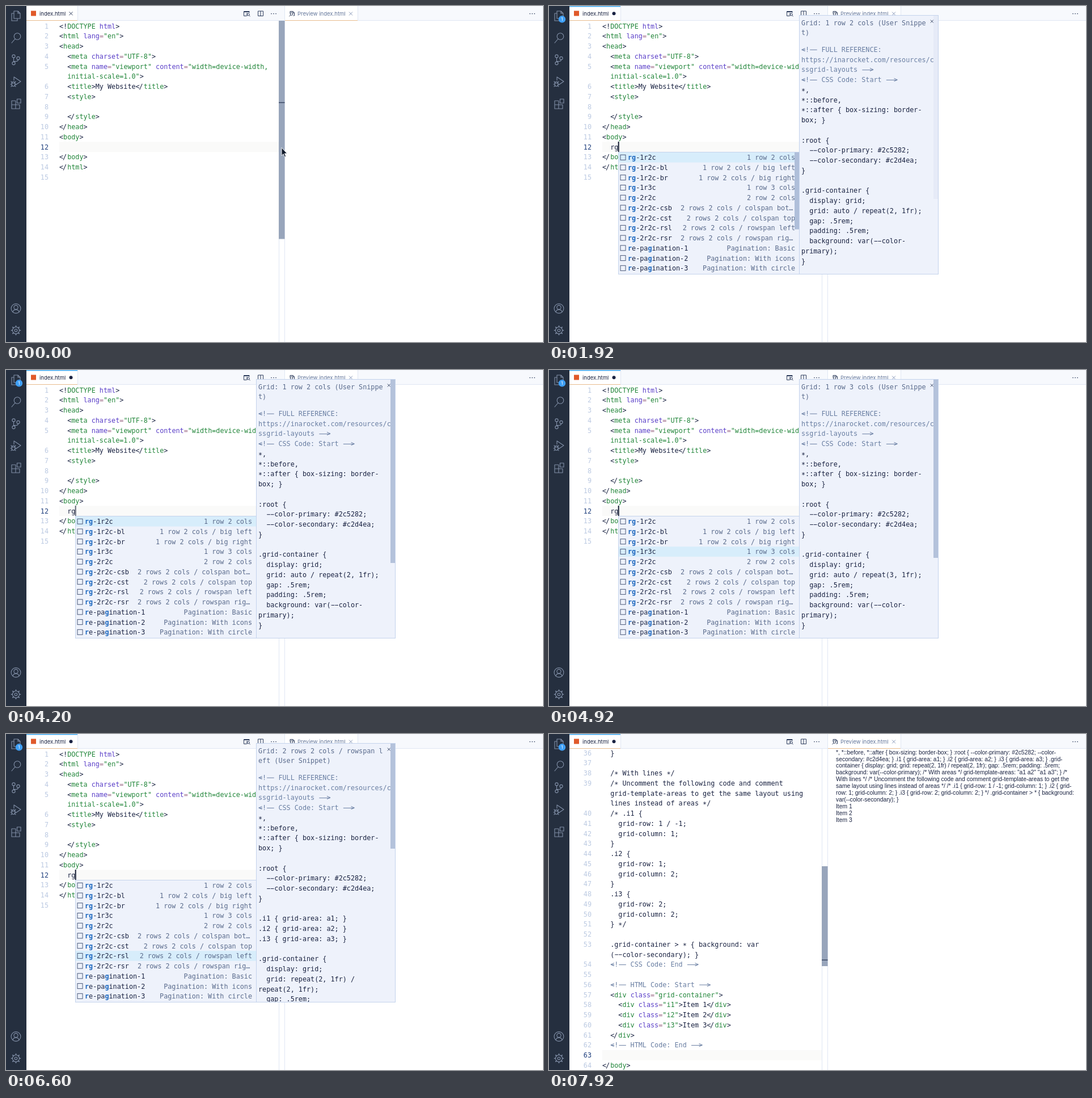
An HTML page that plays this animation: 947x592 px, repeating every 8000 ms.

```html
<!DOCTYPE html>
<html lang="en">
<head>
<meta charset="utf-8">
<title>Snippet completion</title>
<style>
html, body { margin: 0; width: 100%; height: 100%; overflow: hidden; background: #fff; }
svg { display: block; width: 100%; height: 100%; }
.code { font: 11.78px "DejaVu Sans Mono", monospace; }
.ui { font: 9.5px Inter, sans-serif; }
.page { font: 10.3px "Liberation Sans", Arial, sans-serif; }
.icon { fill: none; stroke: #8290a8; stroke-width: 1.1; stroke-linejoin: round; stroke-linecap: round; }
.tool { fill: none; stroke: #2b3a5a; stroke-width: 1; }
</style>
</head>
<body>
<svg id="stage" viewBox="0 0 947 592" preserveAspectRatio="none"></svg>
<script>
const LOOP = 8000, CW = 7.09, ROW = 17.75;
const INK = '#1a2342', GREEN = '#22863a', PURPLE = '#5a3fc8', NOTE = '#6a7fa3', MUTED = '#5a6b8c';
const T = { type: 1440, second: 1560, list: 1740, details: 1860, accept: 7200, preview: 7440 };
const MOVES = [4560, 4740, 4920, 5160, 5460, 5880, 6300];

const esc = s => s.replace(/&/g, '&amp;').replace(/</g, '&lt;').replace(/>/g, '&gt;').replace(/ /g, '\u00a0');
const rect = (x, y, w, h, fill, extra = '') =>
  `<rect x="${x}" y="${y}" width="${w}" height="${h}" fill="${fill}" ${extra}/>`;
const label = (x, y, s, fill, extra = '') => `<text x="${x}" y="${y}" fill="${fill}" ${extra}>${esc(s)}</text>`;
const path = (d, extra = '') => `<path d="${d}" ${extra}/>`;
const ramp = (t, a, b) => Math.max(0, Math.min(1, (t - a) / (b - a)));

// Moves one glyph without moving the text after it
const nudge = (ch, dx, dy) =>
  `<tspan dx="${dx}" dy="${dy}">${ch}</tspan><tspan dx="${-dx}" dy="${-dy}">\u200b</tspan>`;

// Syntax colours, in order of the capture groups below
const TOKEN = /(<!--.*)|("[^"]*"?|^\s*initial[^>]*)|((?<=<[\/!]?)[a-zA-Z]+)|([a-z]+(?==")|(?<=DOCTYPE )html)|(=(?="))/g;
const TINTS = [NOTE, GREEN, GREEN, PURPLE, '#a0708c'];

// Dash strokes, relative to the start of each ligature
const DASHES = { '<!--': [[1.5, 5.5], [15.2, 12.5]], '-->': [[1, 19]], '--': [[1, 5.7], [7.6, 5.7]] };

// One line of code centred on y
function code(x, y, s, fill = INK) {
  const base = y + 4.2;
  let lines = '', out = '', last = 0;
  for (const m of s.matchAll(/<!--|-->|--/g))
    for (const [dx, w] of DASHES[m[0]]) lines += `M${x + m.index * CW + dx} ${base - 3.7}h${w}`;
  const part = (str, tint) => {
    const body = esc(str.replace(/--/g, '  '))
      .replace(/&lt;\//g, '&lt;' + nudge('/', -1.2, 0))
      .replace(/\*/g, nudge('*', 0, 1.8));
    out += `<tspan fill="${tint}">${body}</tspan>`;
  };
  for (const m of s.matchAll(TOKEN)) {
    part(s.slice(last, m.index), fill);
    part(m[0], TINTS[m.slice(1).findIndex(Boolean)]);
    last = m.index + m[0].length;
  }
  part(s.slice(last), fill);
  const stroke = s.includes('<!--') ? NOTE : fill;
  return `<text x="${x}" y="${base}">${out}</text>` + (lines ? path(lines, `stroke="${stroke}"`) : '');
}

// Rows starting with "|" continue the line above
function listing(rows, first, top, active) {
  let n = first - 1, out = '';
  rows.forEach((row, i) => {
    const y = top + i * ROW, wrapped = row[0] === '|';
    if (!wrapped) {
      n++;
      if (n === active) out += rect(94, y - 9, 387, 18, '#fafaf9');
      out += label(75, y + 4.2, String(n), n === active ? '#1f3f7d' : '#bccae2', 'text-anchor="end"');
    }
    out += code(94, y, wrapped ? row.slice(1) : row);
  });
  return out;
}

const START = typed => [
  '<!DOCTYPE html>', '<html lang="en">', '<head>', '  <meta charset="UTF-8">',
  '  <meta name="viewport" content="width=device-width,', '|  initial-scale=1.0">',
  '  <title>My Website</title>', '  <style>', '', '  </style>', '</head>', '<body>',
  '  ' + typed, '</body>', '</html>', ''];

const FILLED = [
  '  }', '', '  /* With lines */', '  /* Uncomment the following code and comment',
  '|  grid-template-areas to get the same layout using', '|  lines instead of areas */',
  '  /* .i1 {', '    grid-row: 1 / -1;', '    grid-column: 1;', '  }',
  '  .i2 {', '    grid-row: 1;', '    grid-column: 2;', '  }',
  '  .i3 {', '    grid-row: 2;', '    grid-column: 2;', '  } */', '',
  '  .grid-container > * { background: var', '|  (--color-secondary); }',
  '  <!-- CSS Code: End -->', '', '  <!-- HTML Code: Start -->',
  '  <div class="grid-container">', '    <div class="i1">Item 1</div>',
  '    <div class="i2">Item 2</div>', '    <div class="i3">Item 3</div>', '  </div>',
  '  <!-- HTML Code: End -->', '', '</body>'];

const PAGE = [
  '*, *::before, *::after { box-sizing: border-box; } :root { --color-primary: #2c5282; --color-',
  'secondary: #c2d4ea; } .i1 { grid-area: a1; } .i2 { grid-area: a2; } .i3 { grid-area: a3; } .grid-',
  'container { display: grid; grid: repeat(2, 1fr) / repeat(2, 1fr); gap: .5rem; padding: .5rem;',
  'background: var(--color-primary); /* With areas */ grid-template-areas: "a1 a2" "a1 a3"; } /*',
  'With lines */ /* Uncomment the following code and comment grid-template-areas to get the',
  'same layout using lines instead of areas */ /* .i1 { grid-row: 1 / -1; grid-column: 1; } .i2 { grid-',
  'row: 1; grid-column: 2; } .i3 { grid-row: 2; grid-column: 2; } */ .grid-container > * { background:',
  'var(--color-secondary); }', 'Item 1', 'Item 2', 'Item 3'];

const ITEMS = [
  ['rg-1r2c', '1 row 2 cols'], ['rg-1r2c-bl', '1 row 2 cols / big left'],
  ['rg-1r2c-br', '1 row 2 cols / big right'], ['rg-1r3c', '1 row 3 cols'],
  ['rg-2r2c', '2 row 2 cols'], ['rg-2r2c-csb', '2 rows 2 cols / colspan bottom'],
  ['rg-2r2c-cst', '2 rows 2 cols / colspan top'], ['rg-2r2c-rsl', '2 rows 2 cols / rowspan left'],
  ['rg-2r2c-rsr', '2 rows 2 cols / rowspan right'], ['re-pagination-1', 'Pagination: Basic'],
  ['re-pagination-2', 'Pagination: With icons'], ['re-pagination-3', 'Pagination: With circle']];

function list(selected) {
  let out = rect(122.5, 257.5, 319, 215, '#eef2fb', 'stroke="#c4d3ec"');
  ITEMS.forEach(([name, info], i) => {
    const y = 267 + i * 17.73;
    if (i === selected) out += rect(123, y - 9, 318, 17.7, '#d7edfb');
    out += rect(126, y - 4.7, 9, 9, 'none', 'stroke="#4a5878"');
    const marked = esc(name).replace(/^rg|^r|g(?=ination)/g, '<tspan fill="#1a66bf" font-weight="bold">$&</tspan>');
    out += `<text x="139" y="${y + 4.2}" fill="${INK}">${marked}</text>`;
    out += info.length > 28
      ? label(232, y + 4.2, info.slice(0, 27) + '…', MUTED)
      : label(434, y + 4.2, info, MUTED, 'text-anchor="end"');
  });
  return out;
}

function details(selected) {
  const title = `Grid: ${ITEMS[selected][1]} (User Snippet)`;
  const cols = ['auto / repeat(2, 1fr);', 'auto / 2fr 1fr;', 'auto / 1fr 2fr;', 'auto / repeat(3, 1fr);'][selected];
  const areas = selected > 4 ? [1, 2, 3].map(n => `.i${n} { grid-area: a${n}; }`).concat('') : [];
  const body = [
    '<!-- FULL REFERENCE:', 'https://inarocket.com/resources/c', 'ssgrid-layouts -->',
    '<!-- CSS Code: Start -->', '*,', '*::before,', '*::after { box-sizing: border-', 'box; }', '',
    ':root {', '  --color-primary: #2c5282;', '  --color-secondary: #c2d4ea;', '}', '',
    ...areas, '.grid-container {', '  display: grid;',
    ...(cols ? ['  grid: ' + cols] : ['  grid: repeat(2, 1fr) /', 'repeat(2, 1fr);']),
    '  gap: .5rem;', '  padding: .5rem;', '  background: var(--color-', 'primary);', '}'];
  return rect(441.5, 16.5, 245, 456, '#eef2fb', 'stroke="#c4d3ec"') +
    code(445, 29.5, title.slice(0, 31), MUTED) + code(445, 47.2, title.slice(31), MUTED) +
    `<g clip-path="url(#box)">` +
    body.slice(0, 23).map((s, i) => code(445, 76.7 + i * ROW, s, i < 4 ? NOTE : INK)).join('') + '</g>' +
    path('M672.8 24.5l5 5m0-5l-5 5', 'stroke="#3c4a68"');
}

function sidebar() {
  const gear = Array.from({ length: 8 }, (_, i) => {
    const a = i * Math.PI / 4, c = Math.cos(a), s = Math.sin(a);
    return `M${17.5 + 6.3 * c} ${571.5 + 6.3 * s}L${17.5 + 8 * c} ${571.5 + 8 * s}`;
  }).join('');
  return rect(0, 0, 36, 592, '#252f3f') + '<g class="icon">' +
    path('M14 9h7l4 4v9h-11zM21 9v4h4M14 13h-4v13h10v-4') +
    '<circle cx="20" cy="53.5" r="5.8"/>' + path('M16 58l-6 7') +
    '<circle cx="13.5" cy="88.5" r="2.6"/><circle cx="13.5" cy="101" r="2.6"/><circle cx="21.5" cy="92" r="2.6"/>' +
    path('M13.5 91v7.4M21.5 94.6q0 3-4 3h-4') +
    path('M14 131v-6l12 8l-9 6') + '<ellipse cx="13" cy="137.5" rx="3" ry="4"/>' +
    path('M10 136h6M9 133l2 2M17 133l-2 2M8 138h2M16 138h2M9 142l2-2M17 142l-2-2') +
    path('M10 167h7v14h-7zM10 174h14v7h-14zM19.5 164h6.5v7h-6.5z') +
    '<circle cx="17.5" cy="533" r="8.4"/><circle cx="17.5" cy="531" r="3.6"/>' + path('M12 539q1-4 5.5-4t5.5 4') +
    '<circle cx="17.5" cy="571.5" r="6"/><circle cx="17.5" cy="571.5" r="2.3"/>' + path(gear, 'stroke-width="1.6"') +
    '</g>';
}

const dots = x => [-4, 0, 4].map(d => `<circle cx="${x + d}" cy="13.5" r=".85" fill="#2b3a5a"/>`).join('');

function chrome() {
  return rect(36, 0, 911, 26, '#f7f9fd') + rect(36, 25, 911, 1, '#e0e7f3') +
    rect(36, 0, 90, 26, '#fff') + rect(492, 0, 128, 26, '#fff') +
    rect(36, 25, 90, 1, '#e8bd8f') + rect(492, 25, 128, 1, '#e8bd8f') +
    path('M126.5 0v25M620.5 0v25M491.5 0v592M481.5 26v566', 'stroke="#e0e7f3"') +
    rect(44, 8.5, 9, 9, '#e0592a') +
    `<g class="ui">${label(59, 16.5, 'index.html', INK)}${label(514, 16.5, 'Preview index.html', '#65789c')}</g>` +
    '<g class="tool">' + path('M429 12v-2.5h-9.5v8h5M419.5 10.5h9.5M425 12v5.5') +
    '<circle cx="427.3" cy="15" r="2"/>' + path('M428.7 16.5l1.8 1.8') +
    path('M444.5 9h9v8.5h-9zM449 9v8.5') +
    path('M501 13v-3.5h5l2.5 2.5v5h-2M506 9.5v2.5h2.5') + '<circle cx="503.5" cy="14" r="2.3"/>' +
    path('M502 15.8l-2.5 2.5') + path('M605 10.5l6 6m0-6l-6 6', 'stroke="#8798b8"') + '</g>' +
    dots(472) + dots(928);
}

const stage = document.getElementById('stage');
stage.innerHTML = `<defs><clipPath id="box"><rect x="442" y="17" width="244" height="455"/></clipPath></defs>
  ${rect(0, 0, 947, 592, '#fff')}
  <g id="editor" class="code"></g>${chrome()}
  <g id="bar"></g><g id="page" class="page"></g>${sidebar()}
  <g id="clean">${path('M111.5 10.3l6 6m0-6l-6 6', 'stroke="#2b3a5a"')}</g>
  <g id="dirty">${rect(36, 0, 90, 1.5, '#45aef5')}<circle cx="114.5" cy="13.3" r="3" fill="${INK}"/>
    <circle cx="23" cy="23.3" r="6.2" fill="#3f9ff5"/>
    <text class="ui" x="23" y="26.4" text-anchor="middle" fill="#fff" style="font-size:8px">1</text></g>
  <rect id="caret" width="2" height="18" fill="#141c33"/>
  <g id="popup" class="code"></g>
  <rect id="listBar" x="433" y="258" width="8" height="135.5" fill="#afbfda"/>
  <rect id="infoBar" x="678" y="17" width="8" fill="#b4c2db"/>
  <path id="pointer" d="M486 249.5v14.2l3.2-3l2.2 5.2l2.2-1l-2.2-5h4.3z" fill="#111a2c" stroke="#fff" stroke-width=".9"/>`;

const el = Object.fromEntries([...stage.querySelectorAll('g[id], rect[id], path[id]')].map(n => [n.id, n]));
const cache = {};
function put(id, key, make) {
  if (cache[id] === key) return;
  cache[id] = key;
  el[id].innerHTML = make();
}
const fade = (id, a) => el[id].setAttribute('opacity', a);

function caretAlpha(t) {
  if (t < T.type) return ramp(t, 120, 300) - ramp(t, 480, 660);
  if (t >= T.accept) return 1 - ramp(t, 7680, 7860);
  if (t < 2220) return 1;
  const p = (t - 2220) % 960;
  return 1 - ramp(p, 0, 180) + ramp(p, 360, 540);
}

// Overview scrollbar with the cursor's mark
const scrollbar = (y, h, mark) => rect(481, y, 10.5, h, '#98a5bb') + rect(481, mark, 10.5, 1.5, '#3d4a66');

function draw(t) {
  const typed = t < T.type ? '' : t < T.second ? 'r' : 'rg';
  const done = t >= T.accept, open = t >= T.list && !done, info = t >= T.details && !done;
  const selected = MOVES.filter(m => m <= t).length;

  put('editor', done ? 'done' : typed, () => done ? listing(FILLED, 36, 33.3, 63) : listing(START(typed), 1, 35.3, 12));
  put('popup', open ? `${selected}${info}` : '', () => open ? list(selected) + (info ? details(selected) : '') : '');
  put('page', t >= T.preview, () => t < T.preview ? '' :
    PAGE.map((s, i) => label(506, 35.7 + i * 11.88, s, INK)).join(''));
  put('bar', done, () => done ? scrollbar(233, 176, 397.5) : scrollbar(26, 384.5, 169.5));

  fade('bar', done ? 1 : 1 - ramp(t, 1380, 1560));
  fade('clean', typed ? 0 : 1);
  fade('dirty', typed ? 1 : 0);
  fade('pointer', typed ? 0 : 1);
  fade('caret', caretAlpha(t));
  el.caret.setAttribute('x', 107.5 + (done ? 0 : typed.length * CW));
  el.caret.setAttribute('y', done ? 557 : 239);
  fade('listBar', open ? 1 - ramp(t, 2220, 3060) : 0);
  fade('infoBar', info ? selected > 4 ? ramp(t, 5460, 5640) : ramp(t, 1890, 2100) : 0);
  el.infoBar.setAttribute('height', selected > 4 ? 185 : selected > 2 ? 314 : 323);
}

function tick(now) {
  draw(now % LOOP);
  requestAnimationFrame(tick);
}
draw(0);
requestAnimationFrame(tick);
</script>
</body>
</html>
```
